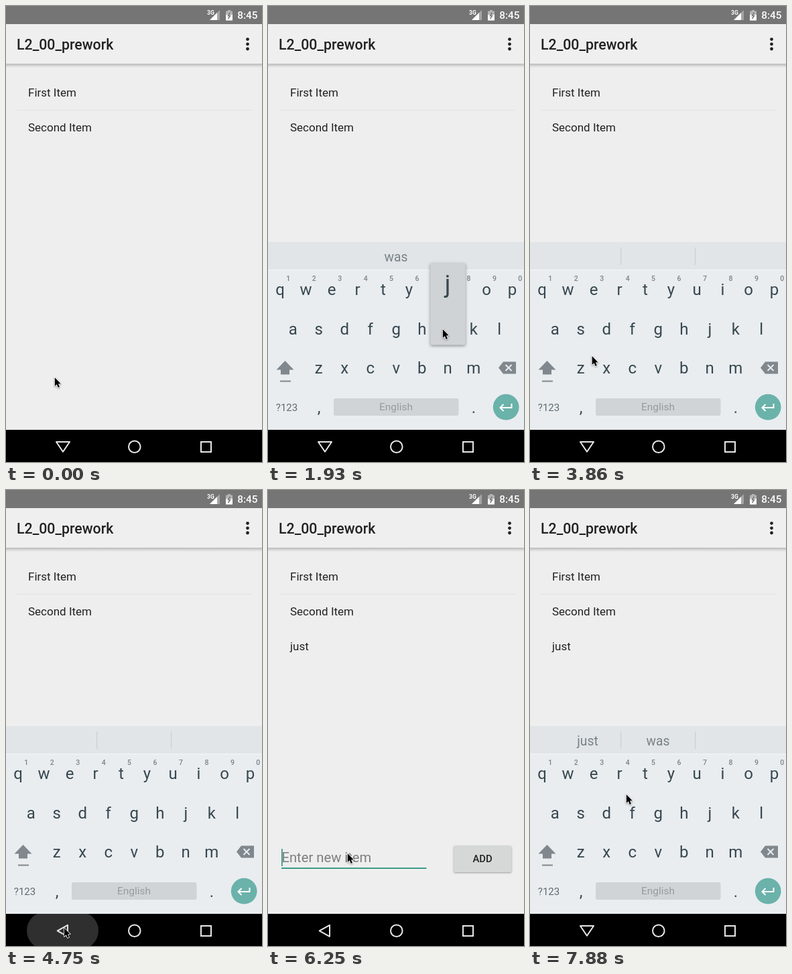
Write an HTML page with a canvas that moves like this. It is 382 px wide and 680 px high and loops after 8 s.

```html
<!DOCTYPE html>
<html lang="en">
<head>
<meta charset="utf-8">
<title>To-do list</title>
<style>
html, body { margin: 0; width: 382px; height: 680px; overflow: hidden; background: #eee; }
canvas { display: block; width: 382px; height: 680px; }
</style>
</head>
<body>
<canvas id="stage"></canvas>
<script>
const W = 382, H = 680, LOOP = 8000, STEP = 148.4, LAST = 53;
const INK = '#37474f', GRAY = '#80888d', TEAL = '#3d9b89', DARK = '#212121', KEYS = '#e9edf0';
const canvas = document.getElementById('stage');
const ratio = window.devicePixelRatio || 1;
canvas.width = W * ratio;
canvas.height = H * ratio;
const c = canvas.getContext('2d');

// Steps at which something happens
const PRESS_J = 13, SUGGEST = 15, PICK = 23, PICKED = 25, TAP_BACK = 30, HIDE = 32, ADD = 39, REOPEN = 46;

// Pointer moves: first step, last step, where the tip ends up
const moves = [
  [3, 4, 72, 540],
  [4, 11, 260, 481],
  [16, 22, 169, 376],
  [PICK, 24, 95, 450],
  [24, 29, 86, 652],
  [33, 37, 314, 547],
  [ADD, 42, 118, 541],
  [42, 44, 112, 546],
  [48, LAST, 143, 453]
];

function pointerAt(n) {
  let x = 72, y = 553;
  for (const [from, to, tx, ty] of moves) {
    const k = Math.max(0, Math.min(1, (n - from) / (to - from)));
    const e = k * k * (3 - 2 * k);
    x += (tx - x) * e;
    y += (ty - y) * e;
  }
  return [x, y];
}

function text(s, x, y, size, color, align = 'left', weight = 400) {
  c.font = `${weight} ${size}px Roboto, sans-serif`;
  c.textAlign = align;
  c.fillStyle = color;
  c.fillText(s, x, y);
}

function rect(x, y, w, h, color) {
  c.fillStyle = color;
  c.fillRect(x, y, w, h);
}

function round(x, y, w, h, r, color) {
  c.beginPath();
  c.roundRect(x, y, w, h, r);
  c.fillStyle = color;
  c.fill();
}

function disc(x, y, r, color) {
  c.beginPath();
  c.arc(x, y, r, 0, Math.PI * 2);
  c.fillStyle = color;
  c.fill();
}

function trace(points, close = true) {
  c.beginPath();
  points.forEach(([x, y]) => c.lineTo(x, y));
  if (close) c.closePath();
}

function poly(points, color) {
  trace(points);
  c.fillStyle = color;
  c.fill();
}

function line(points, color, width, close = false) {
  trace(points, close);
  c.strokeStyle = color;
  c.lineWidth = width;
  c.stroke();
}

function shadowed(blur, dy, alpha, draw) {
  c.save();
  c.shadowColor = `rgba(0,0,0,${alpha})`;
  c.shadowBlur = blur * ratio;
  c.shadowOffsetY = dy * ratio;
  draw();
  c.restore();
}

function statusBar() {
  rect(0, 0, W, 27, '#757575');
  text('3G', 300, 13, 8.5, '#fff', 'left', 700);
  poly([[319, 6], [319, 21], [304, 21]], '#a5a5a5');
  poly([[315, 10], [315, 21], [304, 21]], '#fff');
  rect(331, 6, 4, 2, '#b4b4b4');
  round(328, 7.5, 10, 14, 1, '#b4b4b4');
  rect(328, 13, 10, 8.5, '#fff');
  line([[334.5, 10], [331.5, 14.5], [334.5, 14.5], [331.5, 19]], '#757575', 1.5);
  text('8:45', 375.5, 19.3, 15.3, '#fff', 'right', 500);
}

function toolbar() {
  const g = c.createLinearGradient(0, 86, 0, 92);
  g.addColorStop(0, '#b8b8b8');
  g.addColorStop(0.4, '#d0d0d0');
  g.addColorStop(1, '#eee');
  rect(0, 86, W, 6, g);
  rect(0, 27, W, 59, '#efefef');
  text('L2_00_prework', 16, 65, 21.3, DARK, 'left', 500);
  for (let i = -1; i <= 1; i++) disc(360.5, 56.8 + i * 7.2, 2.4, DARK);
}

function list(n) {
  const items = ['First Item', 'Second Item'];
  if (n >= ADD) items.push('just');
  items.forEach((s, i) => text(s, 33, 135.3 + i * 52, 17, DARK));
  rect(16, 155, 352, 1, '#e2e2e2');
}

function form(n) {
  if (n <= HIDE || n >= REOPEN) return;
  const typed = n < ADD;
  text(typed ? 'just' : 'Enter new item', 20.5, 555, 20.2, typed ? DARK : '#7e7e7e');
  const caret = typed ? 22 + c.measureText('just').width : 20;
  rect(caret, 535, 1.8, 26, TEAL);
  rect(20, 563, 216.5, 2, TEAL);
  shadowed(2.5, 1, 0.35, () => round(277.3, 530.5, 86, 39.5, 2, n === ADD ? '#c4c5c5' : '#d6d7d7'));
  text('ADD', 320, 555.3, 14.8, DARK, 'center', 500);
}

function suggestions(n) {
  const words = n < PICKED ? ['John', 'just', 'July'] : n < REOPEN ? [] : ['just', 'was'];
  const word = (s, x) => text(s, x, 381, 19.3, '#788186', 'center');
  rect(0, 352, W, 41, '#e1e5e8');
  if (n < SUGGEST) return word('was', 191);
  if (n === PICK) rect(136, 352, 111, 41, '#cfd3d6');
  for (const x of [135, 246]) rect(x, 360, 1.2, 26, '#cbcfd2');
  words.forEach((s, i) => word(s, 86 + i * 105));
  if (n < PICKED) for (let i = -1; i <= 1; i++) disc(191 + i * 6, 390, 1.7, '#566066');
}

function specialKeys() {
  poly([[25.5, 529], [38.5, 542.5], [12.5, 542.5]], GRAY);
  rect(19, 542, 13, 7.5, GRAY);
  rect(18, 558.5, 16, 2, GRAY);

  poly([[344, 539.5], [351, 530.5], [370, 530.5], [370, 548.5], [351, 548.5]], GRAY);
  for (const s of [-1, 1]) line([[354.5, 539.5 - s * 4.5], [363.5, 539.5 + s * 4.5]], KEYS, 2);

  text('?123', 28, 604, 15, '#5f6a70', 'center');
  text(',', 76, 606.5, 24, INK, 'center');
  text('.', 307, 606.5, 24, INK, 'center');
  round(98, 585, 186.5, 26, 3, '#d0d4d7');
  text('English', 191, 603.3, 15.4, '#949b9f', 'center');

  disc(355.2, 598.2, 19.4, '#6ab2aa');
  line([[363.5, 593], [363.5, 599], [347, 599]], '#fff', 2);
  line([[351.5, 594], [346.5, 599], [351.5, 604]], '#fff', 2);
}

function keyboard(n) {
  suggestions(n);
  rect(0, 393, W, 239, KEYS);
  rect(0, 393, W, 1.5, '#f0f3f5');
  ['qwertyuiop', 'asdfghjkl', 'zxcvbnm'].forEach((keys, row) => {
    const x = 18 + 19.25 * [0, 1, 3][row];
    [...keys].forEach((k, i) => text(k, x + i * 38.5, 431 + row * 58.5, 24, INK, 'center'));
  });
  for (let i = 0; i < 10; i++) text((i + 1) % 10, 30.3 + i * 38.45, 410, 10.5, '#7b8388', 'center', 500);
  specialKeys();
  if (n === PRESS_J) {
    shadowed(4, 1.5, 0.4, () => round(242.2, 383.5, 52.3, 122, 2, '#cfd3d6'));
    text('j', 268, 427, 36, INK, 'center');
  }
}

function keyboardAlpha(n) {
  const rise = n < HIDE ? n : n - REOPEN + 1;
  const shown = n <= HIDE + 1 && n > 4 ? HIDE + 2 - n : rise;
  return Math.max(0, Math.min(1, shown / 2));
}

function ripple(n) {
  const growth = [0.7, 0.7, 1, 1][n - TAP_BACK];
  if (!growth) return;
  const w = 107 * growth;
  round(84.5 - w / 2, 629, w, 56, 28, n > HIDE ? '#161616' : '#2f2f2f');
}

function navBar(n) {
  rect(0, 632, W, 48, '#000');
  c.save();
  c.beginPath();
  c.rect(0, 632, W, 48);
  c.clip();
  ripple(n);
  c.restore();
  const back = n >= HIDE && n < REOPEN
    ? [[76.7, 657.3], [92, 648.8], [92, 665.8]]
    : [[75, 650], [95, 650], [85, 664.7]];
  c.lineJoin = 'round';
  line(back, '#e8e8e8', 2, true);
  c.lineJoin = 'miter';
  c.beginPath();
  c.arc(191.8, 657.3, 8.8, 0, Math.PI * 2);
  c.stroke();
  c.strokeRect(291, 650, 15, 15);
}

function pointer(x, y) {
  const shape = [[0, 0], [0, 13], [3, 10.3], [5, 15], [7.2, 14], [5.2, 9.5], [9, 9.3]]
    .map(([dx, dy]) => [x + 0.8 + dx, y + 1 + dy]);
  c.lineJoin = 'round';
  shadowed(2.5, 1, 0.4, () => line(shape, '#fff', 1.6, true));
  poly(shape, '#000');
  c.lineJoin = 'miter';
}

function draw(n) {
  c.setTransform(ratio, 0, 0, ratio, 0, 0);
  rect(0, 0, W, H, '#eee');
  list(n);
  toolbar();
  statusBar();
  form(n);
  const alpha = keyboardAlpha(n);
  if (alpha) {
    c.save();
    c.globalAlpha = alpha;
    c.translate(0, (1 - alpha) * 20);
    keyboard(n);
    c.restore();
  }
  navBar(n);
  pointer(...pointerAt(n));
}

// The screen refreshes in even steps, so the pose is held between them
function tick() {
  const t = performance.now() % LOOP;
  draw(Math.min(LAST, Math.floor((t + 10) / STEP)));
  requestAnimationFrame(tick);
}
tick();
</script>
</body>
</html>
```
